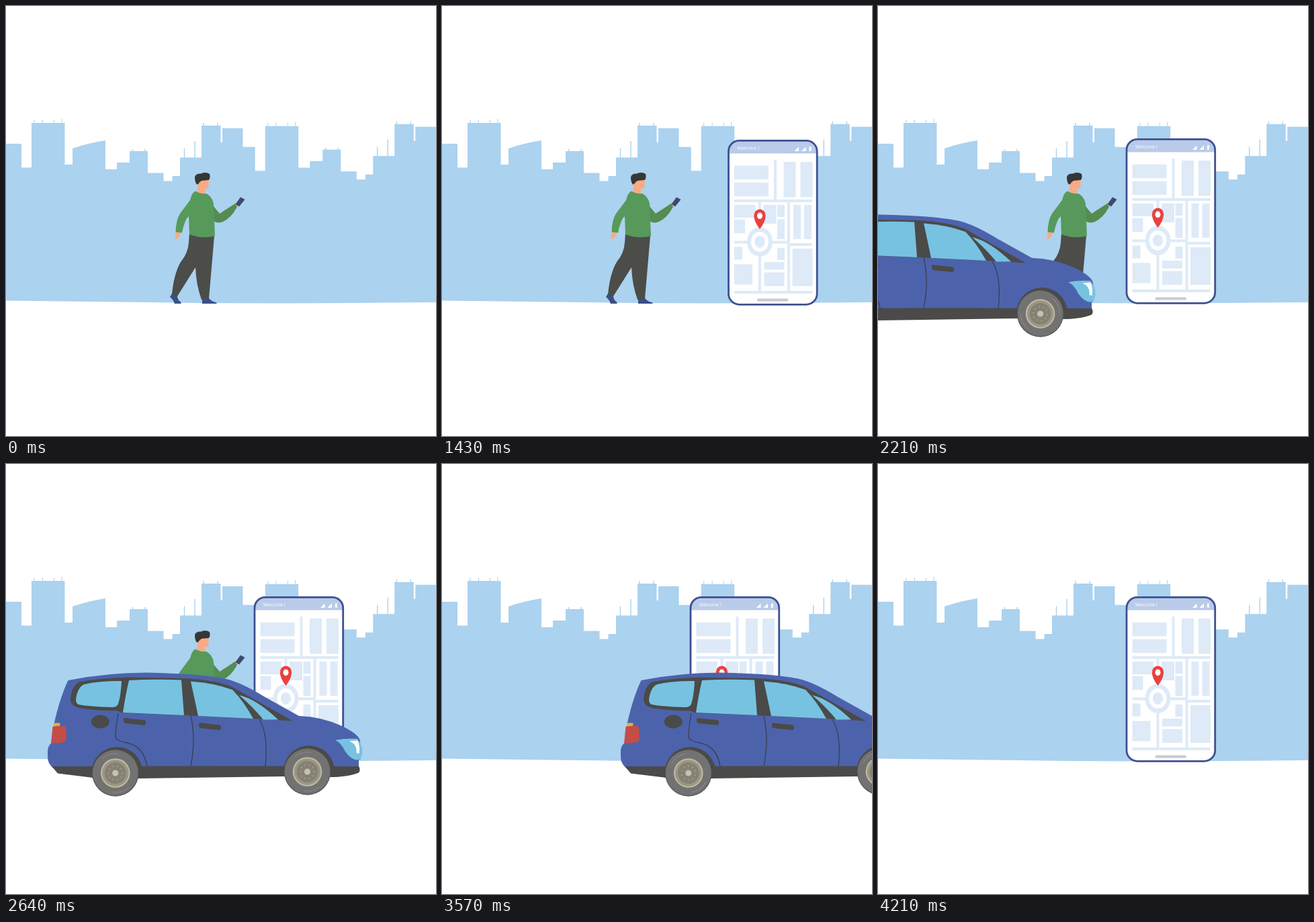
Write an HTML page with a canvas that moves like this. It is 640 by 640 pixels and loops after 4780 ms.

```html
<!DOCTYPE html>
<html lang="en">
<head>
<meta charset="utf-8">
<title>Ride pick-up</title>
<style>
  html, body { margin: 0; width: 100%; height: 100%; overflow: hidden; background: #fff; }
  canvas { display: block; width: 640px; height: 640px; }
</style>
</head>
<body>
<canvas id="stage" width="640" height="640"></canvas>
<script>
const ctx = document.getElementById('stage').getContext('2d');

const LOOP = 4780, START = 860, STEP = 71.25;
// Steps at which the car enters, has parked, drives off and is out of sight.
const ENTER = 10, PARKED = 23, LEAVE = 31, GONE = 47;
const SKY = '#abd2ef', MAP = '#deeaf7', DARK = '#4a4a48', BODY = '#4c63ac',
      GLASS = '#77c2e1', SKIN = '#f9ab82', NAVY = '#3f5190';

const progress = (step, from, to) => Math.min(1, Math.max(0, (step - from) / (to - from)));
const phoneX = step => 255.5 * (1 - progress(step, 0, 10) ** 1.12);
const carX = step => 538 * (progress(step, ENTER, PARKED) - 1)
                   + 580 * progress(step, LEAVE, GONE) ** 1.264;

function fill(color, d) {
  ctx.fillStyle = color;
  ctx.fill(new Path2D(d));
}

function line(color, width, d) {
  ctx.strokeStyle = color;
  ctx.lineWidth = width;
  ctx.stroke(new Path2D(d));
}

function disc(color, x, y, rx, ry = rx) {
  ctx.fillStyle = color;
  ctx.beginPath();
  ctx.ellipse(x, y, rx, ry, 0, 0, Math.PI * 2);
  ctx.fill();
}

function shifted(x, y, draw) {
  ctx.save();
  ctx.translate(x, y);
  draw();
  ctx.restore();
}

function tower() {
  fill(SKY, 'M0 430V205H23V240.5H38V174H87.5V236H99V430Z');
  line(SKY, 1, 'M42 169v6M54.5 169v6M71.5 169v6M83 168v6');
}

function rooftops() {
  fill(SKY, `M148 430V243H165V233H184V216H211V248.5H234.5V260.5H247.5V253H259V225.5H291
    V178H319.5V203H322V182H352.5V430Z`);
  line(SKY, 1.4, 'M188.5 213v4M207 213v4M265.5 212v14M281 201v25M294 174v5M315 174v5');
}

// The city is two kinds of block, each repeated once further right.
function skyline() {
  shifted(0, 0, tower);
  fill(SKY, 'M99 430V212Q122 204 148 200V430Z');
  shifted(0, 0, rooftops);
  shifted(347.7, 4.7, tower);
  shifted(287.3, -2.2, rooftops);
  fill(SKY, 'M0 425H640V441Q400 443.5 250 441.5L0 438.5Z');
}

function man() {
  fill('#3b4f86', 'M247 428L255 432Q255 437 260.5 441V443H251Q249 437 244 433Z');
  fill('#3b4f86', 'M292 436L302 435Q306 440 313.5 441.5V443H292Z');
  fill('#4c4c49', `M273 338Q290 344 310 342L302 435.5Q297 438 291 437Q283 415 282 389L255 432
    Q250 432 247 429Q250 398 260 381Q271 368 272 352Z`);
  fill(SKIN, 'M253 336H260Q260 342 255 346.5L251 346Z');
  fill(SKIN, 'M340 294L343 291.5L347 297L344 299Z');
  fill('#548c52', 'M308 297L318 309L341 294L344 299Q335 316 322 321.5Q314 324 309 320Z');
  fill('#3b4a72', 'M349 284.5L355.5 288L347 298.5L341.5 295Z');
  fill(SKIN, 'M285 262L290 258L301.5 257V269Q300 273 295.5 272L296 280Q289 281 284 277L286 265Z');
  fill('#57995a', `M282 275.5Q289 280 298 279Q307 284 309 294L311 342.5Q291 347 273 340L272 313
    L269 316Q264 326 262 337.5L252.5 336.5Q253 318 259 309L274 289Q277 277 282 275.5Z`);
  fill('#363636', `M284 265.5Q281 262 281 255Q282 249 290 249.5Q298 246.5 303 250
    Q304.5 255 302 259L291 260L288.5 262L285.5 265.5Z`);
}

// City blocks are broad strokes, streets are narrow ones.
function streetMap() {
  line(MAP, 20.5, 'M378.5 246h51m-51 25h51M378.5 326h16');
  line(MAP, 18, 'M461 230v52.5M486 230v52.5');
  line(MAP, 11, 'M472 294v51m16 -51v51M448 294v18m0 3.5v29.5m0 13v18');
  line(MAP, 30, 'M378.5 397.5h27M438 379v11.5m0 4v20.5M480 359v56');
  line(MAP, 19, 'M378.5 303.5h31.5M378.5 366h12M431.5 294v28');
  line(MAP, 4, `M378.5 288h116M439.5 227v60M416.5 290v133M459.5 290v133M461 353h33.5
    M378.5 349.5h79.5M378.5 424h116`);
  disc(MAP, 416.5, 349, 19, 22);
  disc('#fff', 416.5, 349, 13, 15);
  disc(MAP, 416.5, 349, 7.7, 9);
}

function phone() {
  ctx.beginPath();
  ctx.roundRect(370, 198.3, 131.7, 244, 16);
  ctx.fillStyle = '#fff';
  ctx.fill();
  ctx.save();
  ctx.clip();
  fill('#b9cbe9', 'M369 197h135v20.5h-135z');
  ctx.restore();
  ctx.strokeStyle = NAVY;
  ctx.lineWidth = 2.8;
  ctx.stroke();

  ctx.fillStyle = '#fff';
  ctx.font = '6.8px "Open Sans", "Noto Sans", sans-serif';
  ctx.fillText('Welcome !', 383, 212.4);
  fill('#fff', 'M468 214l6.5-6.5v6.5zM478.5 214l6.5-6.5v6.5zM490 207.5h3v6.5h-3z');

  streetMap();
  fill('#e8423f', 'M416.5 330Q408 319 407.8 310A8.7 9.5 0 0 1 425.2 310Q425 319 416.5 330Z');
  disc('#fff', 416.5, 310.3, 4, 4.8);
  ctx.lineCap = 'round';
  line('#c9c9d6', 4, 'M414.5 435.5h42.5');
  ctx.lineCap = 'butt';
}

function wheel(angle) {
  fill(DARK, 'M-35.5 7V-1A38 38 0 0 1 40.5 -1V7Z');
  disc('#565653', 0, 0, 34.7);
  disc('#727272', 0, -0.6, 33.8);
  ctx.rotate(angle);
  line('#8b8b89', 1, 'M-20 -21A29 29 0 0 1 5 -28.5M20 21A29 29 0 0 1 -5 28.5');
  disc('#c0baa5', 0, 0, 21.8);
  disc('#9c9784', 0, 0, 19.8);
  disc('#868273', 0, 0, 16);
  for (let a = 0; a < 10; a++) {
    ctx.rotate(Math.PI / 5);
    disc('#b1ab99', 10.5, 0, 0.9);
  }
  disc('#c5c0b2', 0, 0, 4.6);
}

function handle() {
  fill(DARK, 'M2 0L31 3.2Q33.5 4 33 7Q33 11 30 10.8L3 8Q-.5 7 0 3Q0 0 2 0Z');
}

function car(angle) {
  fill(BODY, `M92.5 322Q150 310.5 210 310.5Q290 312 326 319.5Q350 325 384 346L436 375
    Q470 376 500 390Q525 402 527 412L528 438L525 441V452H70Q62 446 62 436V428Q62 419 68 415
    L71 389Q80 348 92.5 322Z`);
  fill(DARK, 'M68 450L300 449.5L525 450Q528 454 525.5 459Q510 467 470 466L413 465L200 468L130 467L77 460.5Z');

  fill(DARK, `M96 350Q97 332 108 324.5Q145 318 182 317.5L266 319Q310 321 336 331.5L427 382.5
    L377 379.5L285 375L173 370.5L166 367.5Q130 367 108 363Q96 360 96 350Z`);
  fill(GLASS, `M104 351Q106 333 116 328Q140 322.5 172 323Q171 345 167 357Q165 362 158 362
    Q124 361 108 358Q104 356 104 351Z`);
  fill(GLASS, 'M183 322Q222 320 261 321.5L265 374L174 370Q178 343 183 322Z');
  fill(GLASS, 'M275 323.5Q310 326 337 336Q353 352 368 379L286 375Z');
  fill(GLASS, 'M347 344Q373 350 405 380.5L383 380.5Q366 360 347 344Z');

  line('#3b3d50', 1.3, `M167 371Q163 394 163 407Q166 413 180 415Q205 420 210 450
    M275 375Q283 410 275 449M377 380Q391 403 386 450`);
  shifted(175, 378, handle);
  shifted(287, 385.3, handle);
  disc(DARK, 140.3, 383.5, 13.5, 10);

  fill('#dcb441', 'M71.5 385.5H80.5L80 391H70Z');
  fill('#c44d48', 'M69.5 391Q78 389 88 390Q91 401 89 412Q86 416 67 415.5Z');
  fill(GLASS, 'M490 411Q505 408 523 409Q531 418 530.5 430Q529 440 523 440.5Q513 440 505 428Q499 415 490 411Z');
  fill('#fff', 'M511 412.5L523 411.5Q527.5 420 525.5 431L521.5 430Q523 417 511 412.5Z');

  shifted(162.8, 460, () => wheel(angle));
  shifted(448.5, 458, () => wheel(angle));
}

function render(t) {
  const step = Math.floor((t - START) / STEP + 0.02);
  ctx.fillStyle = '#fff';
  ctx.fillRect(0, 0, 640, 640);
  skyline();
  if (step <= LEAVE) man();
  if (step >= 0) shifted(phoneX(step), phoneX(step) * 0.035, phone);
  if (step > ENTER && step < GONE) shifted(carX(step), 0, () => car((step - 25) * 0.7));
}

function tick() {
  render(performance.now() % LOOP);
  requestAnimationFrame(tick);
}
tick();
</script>
</body>
</html>
```
